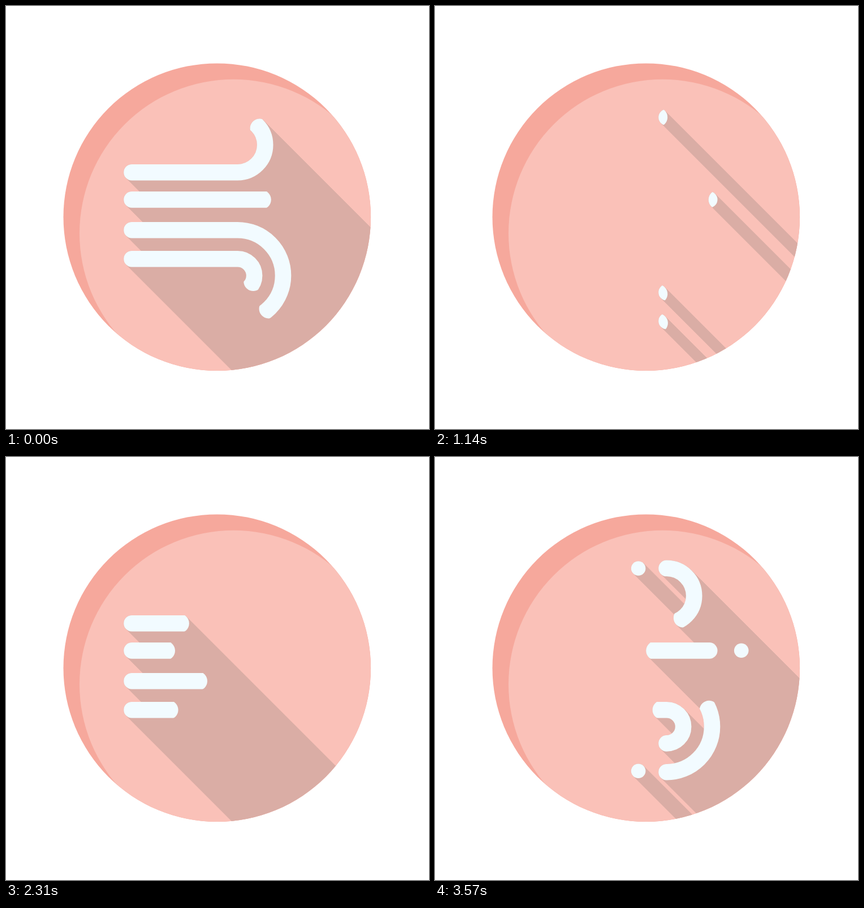
Animation, 748 px wide and 748 px high, one loop 3.6 s. Source, as an HTML page with a canvas:

```html
<!DOCTYPE html>
<html lang="en">
<head>
<meta charset="utf-8">
<title>Wind</title>
<style>
  html, body { margin: 0; width: 100%; height: 100%; overflow: hidden; background: #fff; }
  canvas { display: block; }
</style>
</head>
<body>
<canvas id="stage" width="748" height="748"></canvas>
<script>
const SIZE = 748, LOOP = 3600, CYCLE = 885, START = 20, STEP = 30;
const LINE_WIDTH = 28.6, MASK_WIDTH = 34, LEAD_IN = 45, LEAD_OUT = 17;
const LEFT = 222.5, BEND = 409.5;

const newLayer = () =>
  Object.assign(document.createElement('canvas'), { width: SIZE, height: SIZE }).getContext('2d');
const ctx = document.getElementById('stage').getContext('2d');
const shape = newLayer(), gust = newLayer(), shadow = newLayer(), copy = newLayer();

// Each line runs right, then optionally curls up (turn -1) or down (turn 1).
const lines = [
  { y: 294.2, radius: 48.7, turn: -1, drift: 0 },
  { y: 342.4, radius: 0, end: 485.2 },
  { y: 396.2, radius: 80.5, turn: 1, drift: 4 },
  { y: 447.2, radius: 29.6, turn: 1, drift: 3 }
];
const dots = [[359.6, 197], [541.7, 342.2], [359.6, 555.2]];

function tracePath({ y, radius, turn, end, drift }, before, after) {
  const path = new Path2D();
  path.moveTo(LEFT - before, y);
  if (!radius) {
    path.lineTo(end + after, y);
    return path;
  }
  path.arc(BEND, y + turn * radius, radius, -turn * Math.PI / 2, turn * Math.PI / 2, turn < 0);
  if (after) path.lineTo(BEND - after, y + turn * 2 * radius + drift);
  return path;
}

shape.lineCap = gust.lineCap = 'round';
shape.lineWidth = LINE_WIDTH;
for (const line of lines) {
  shape.stroke(tracePath(line, 0, 0));
  line.mask = tracePath(line, LEAD_IN, LEAD_OUT);
  line.length = LEAD_IN + LEAD_OUT + (line.radius ? BEND - LEFT + Math.PI * line.radius : line.end - LEFT);
}

function fillCircle(c, x, y, r, color) {
  c.fillStyle = color;
  c.beginPath();
  c.arc(x, y, r, 0, 2 * Math.PI);
  c.fill();
}

function tint(c, color) {
  c.globalCompositeOperation = 'source-in';
  c.fillStyle = color;
  c.fillRect(0, 0, SIZE, SIZE);
  c.globalCompositeOperation = 'source-over';
}

function drawGust(step) {
  const leaving = step < 12;
  const k = step - 12;
  const tail = leaving ? Math.min(1, 0.655 + 0.0486 * step) : 0;
  const head = leaving ? 1 : 0.0696 * k - 0.00105 * k * k;
  gust.clearRect(0, 0, SIZE, SIZE);
  gust.lineWidth = MASK_WIDTH;
  if (head > tail) {
    for (const { mask, length } of lines) {
      gust.setLineDash([(head - tail) * length, 9999]);
      gust.lineDashOffset = -tail * length;
      gust.stroke(mask);
    }
  }
  gust.globalCompositeOperation = 'destination-in';
  gust.drawImage(shape.canvas, 0, 0);
  gust.globalCompositeOperation = 'source-over';
  const dotRadius = 12.8 * (1 - (step / 5) ** 2);
  if (dotRadius > 0) for (const [x, y] of dots) fillCircle(gust, x, y, dotRadius, '#000');
  tint(gust, '#f2fbff');
}

// Sweeps the silhouette diagonally, doubling the swept distance each pass.
function drawShadow() {
  shadow.clearRect(0, 0, SIZE, SIZE);
  shadow.drawImage(gust.canvas, 0, 0);
  for (let shift = 1; shift <= 256; shift *= 2) {
    copy.clearRect(0, 0, SIZE, SIZE);
    copy.drawImage(shadow.canvas, 0, 0);
    shadow.drawImage(copy.canvas, shift, shift);
  }
  tint(shadow, '#daada5');
}

function draw() {
  const time = performance.now() % LOOP;
  drawGust(Math.floor((time - START + CYCLE) % CYCLE / STEP));
  drawShadow();
  ctx.fillStyle = '#fff';
  ctx.fillRect(0, 0, SIZE, SIZE);
  ctx.save();
  fillCircle(ctx, 373.3, 373.2, 271.8, '#f6a89c');
  ctx.clip();
  fillCircle(ctx, 402.3, 402, 272.3, '#fac1b8');
  ctx.drawImage(shadow.canvas, 0, 0);
  ctx.restore();
  ctx.drawImage(gust.canvas, 0, 0);
  requestAnimationFrame(draw);
}
draw();
</script>
</body>
</html>
```
